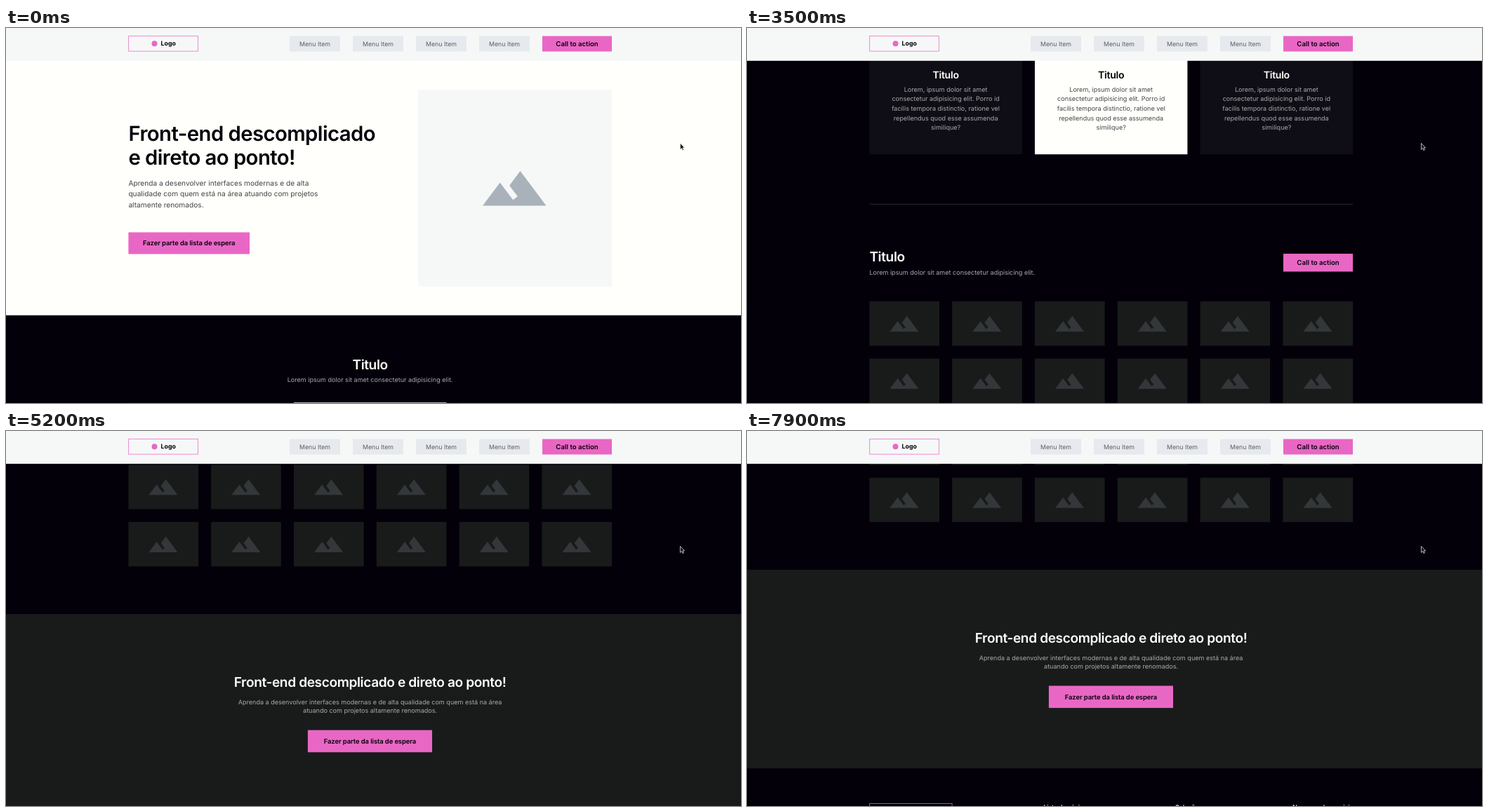
Recreate the animation shown at these times as an HTML page. Size 1047 by 535 pixels, loop 8000 ms.

```html
<!DOCTYPE html>
<html lang="pt-BR">
<head>
<meta charset="utf-8">
<title>Landing page</title>
<style>
  html, body { margin: 0; width: 100%; height: 100%; overflow: hidden; background: #fffffc; }
  svg { display: block; width: 100%; height: 100%; }
  text { font-family: Inter, "Open Sans", sans-serif; text-rendering: geometricPrecision; }
  .title { font-weight: 600; letter-spacing: -.02em; }
  .button { font-weight: 600; }
  .tight { font-weight: 600; letter-spacing: -.3px; }
  .logo { font-weight: 700; }
</style>
</head>
<body>
<svg id="stage" viewBox="0 0 1047 535" preserveAspectRatio="none"></svg>
<script>
const PINK = '#e967c4', INK = '#03000a', IVORY = '#fffffc', MIST = '#f6f8f8';
const COAL = '#191b1b', GREY = '#a9a9ac', TEXT = '#444446';
const LEFT = 174.4, RIGHT = 863, MIDDLE = 518.6, LOOP = 8000, TICK = 100;
const BODY = 9.05, HEADING = 19.1;

const rect = (x, y, w, h, fill, extra = '') =>
  `<rect x="${x}" y="${y}" width="${w}" height="${h}" fill="${fill}" ${extra}/>`;

const dot = (x, y, r, fill) => `<circle cx="${x}" cy="${y}" r="${r}" fill="${fill}"/>`;

const text = (str, x, y, size, fill, cls = '', anchor = 'start') =>
  `<text x="${x}" y="${y}" font-size="${size}" fill="${fill}" class="${cls}" text-anchor="${anchor}">${str}</text>`;

const lines = (rows, x, y, step, size, fill, anchor) =>
  rows.map((row, i) => text(row, x, y + i * step, size, fill, '', anchor)).join('');

const repeat = (n, draw) => Array.from({ length: n }, (_, i) => draw(i)).join('');

const mountain = (x, y, scale, fill) =>
  `<path transform="translate(${x} ${y}) scale(${scale})" fill="${fill}"
    d="M14 6L10.25 11L13.1 14.8L11.5 16L7 10L1 18H23Z"/>`;

const button = (label, x, y, w, h, size) =>
  rect(x, y, w, h, PINK) + text(label, x + w / 2, y + h / 2 + 3.4, size, INK, 'button', 'middle');

const waitButton = (x, y, w, h) =>
  `<g letter-spacing="-.1">${button('Fazer parte da lista de espera', x, y, w, h, 9.45)}</g>`;

const logo = (y, w, h, dotX, color) =>
  rect(LEFT + .3, y, w, h, 'none', `stroke="${PINK}" stroke-width=".75"`) +
  dot(dotX, y + h / 2, 4, PINK) +
  text('Logo', dotX + 9.1, y + h / 2 + 2.8, 8.8, color, 'logo');

function header() {
  return rect(0, 0, 1047, 46.8, MIST) + logo(11.3, 98.8, 21.8, 211.5, INK) +
    repeat(4, i => {
      const x = 404 + i * 90;
      return rect(x, 11.5, 72, 22, '#e6eaee') +
        text('Menu Item', x + 36, 25.6, 8.8, '#5c5d60', '', 'middle');
    }) +
    button('Call to action', 764, 11.5, 99, 22, 9.6);
}

function hero() {
  const copy = [
    'Aprenda a desenvolver interfaces modernas e de alta',
    'qualidade com quem está na área atuando com projetos',
    'altamente renomados.'
  ];
  return text('Front-end descomplicado', LEFT, 160.5, 29.35, INK, 'title') +
    text('e direto ao ponto!', LEFT, 194.7, 29.35, INK, 'title') +
    lines(copy, LEFT, 225.1, 15.3, 10.19, TEXT) +
    waitButton(LEFT, 291.5, 172.6, 31) +
    rect(587, 88, 276, 281, MIST) +
    mountain(674.9, 179.4, 4.114, '#a9b2ba');
}

function card(i) {
  const x = LEFT + i * 235.6, cx = x + 108.7, light = i === 1;
  const copy = [
    'Lorem, ipsum dolor sit amet',
    'consectetur adipisicing elit. Porro id',
    'facilis tempora distinctio, ratione vel',
    'repellendus quod esse assumenda',
    'similique?'
  ];
  return rect(x, 534.3, 217.4, 216.9, light ? IVORY : '#0f0e16') +
    `<g transform="translate(${cx} 588.7)" fill="none" stroke="${PINK}">
      <circle r="13.5" stroke-width="1.1"/>
      <path d="M-7.2-4V4M1.2-4H-1.2Q-3-4-3-2.2V2.2Q-3 4-1.2 4H1.2"/>
      <rect x="4" y="-4" width="4.6" height="8" rx="1.4"/>
    </g>` +
    text('Titulo', cx, 643.1, 14.1, light ? INK : IVORY, 'title', 'middle') +
    lines(copy, cx, 661.8, 13.6, BODY, light ? TEXT : GREY, 'middle');
}

function features() {
  return rect(0, 409.9, 1047, 1400, INK) +
    text('Titulo', MIDDLE, 487, HEADING, IVORY, 'title', 'middle') +
    text('Lorem ipsum dolor sit amet consectetur adipisicing elit.', MIDDLE, 505.2, BODY, GREY, '', 'middle') +
    repeat(3, card) +
    rect(LEFT, 821.8, RIGHT - LEFT, 1, '#29282f');
}

function gallery() {
  return text('Titulo', LEFT, 904.4, HEADING, IVORY, 'title') +
    text('Lorem ipsum dolor sit amet consectetur adipisicing elit.', LEFT, 922.6, BODY, GREY) +
    button('Call to action', 764, 893, 99, 25.5, 9.6) +
    repeat(12, i => {
      const x = LEFT + (i % 6) * 117.8, y = 961 + Math.floor(i / 6) * 81.6;
      return rect(x, y, 99.6, 63.3, COAL) + mountain(x + 27.2, y + 9.6, 1.864, '#33373a');
    });
}

function invite() {
  const copy = [
    'Aprenda a desenvolver interfaces modernas e de alta qualidade com quem está na área',
    'atuando com projetos altamente renomados.'
  ];
  return rect(0, 1174, 1047, 283.4, COAL) +
    text('Front-end descomplicado e direto ao ponto!', MIDDLE, 1278, HEADING, IVORY, 'title', 'middle') +
    lines(copy, MIDDLE, 1303.1, 11.4, BODY, GREY, 'middle') +
    waitButton(429.9, 1339.5, 177.1, 31.6);
}

function footer() {
  const linkY = i => 1541.1 + i * 29.5;
  const links = (x, n) => repeat(n, i => text(`Text link 0${i + 1}`, x, linkY(i), 8.4, GREY));
  const heading = (label, x) => text(label, x, 1515.7, 9, IVORY, 'tight');
  const social = ['Fotobrisa', 'Tramelio', 'Vistelo'];
  return logo(1507.5, 117.4, 31, 220.4, IVORY) +
    lines(['Lorem ipsum dolor sit amet consectetur', 'adipisicing elit.'], LEFT, 1567.8, 11.8, 7.93, GREY) +
    heading('Lista de páginas', 422.5) + links(422.5, 4) +
    heading('Soluções', 610) + links(610, 2) +
    heading('Nossas redes sociais', 777) +
    social.map((name, i) => dot(782.5, linkY(i) - 3.2, 4.3, IVORY) +
      text(name, 792.7, linkY(i) + .2, BODY, GREY)).join('');
}

const cursor = `<path d="M960.4 164.4V173.4L962.5 171.5L963.9 174.6L965.4 173.9L964 170.9H966.6Z"
  fill="#16151a" stroke="#e4e4e6" stroke-width=".75" stroke-linejoin="round"/>`;

const stage = document.getElementById('stage');
stage.innerHTML = rect(0, 0, 1047, 535, IVORY) +
  `<g id="page">${hero()}${features()}${gallery()}${invite()}${footer()}</g>` + header() + cursor;
const page = document.getElementById('page');

// Scroll bursts: start time, number of steps, end position, slow-start power
const bursts = [
  [1000, 7, 150.2],
  [1800, 6, 356],
  [2600, 6, 562],
  [3500, 7, 724],
  [4400, 6, 876],
  [5100, 8, 1111.5],
  [6000, 4, 1145],
  [7000, 7, 1035, 1.4],
  [7800, 2, 976]
];

function scrollAt(time) {
  let pos = 0;
  for (const [start, steps, end, power = 1] of bursts) {
    if (time < start) break;
    const done = Math.min(1, (Math.floor((time - start) / TICK) + 1) / steps) ** power;
    pos += (end - pos) * done * done * (3 - 2 * done);
  }
  return pos;
}

const begin = performance.now();
function draw() {
  const time = (performance.now() - begin) % LOOP;
  page.setAttribute('transform', `translate(0 ${-scrollAt(time)})`);
  requestAnimationFrame(draw);
}
draw();
</script>
</body>
</html>
```
